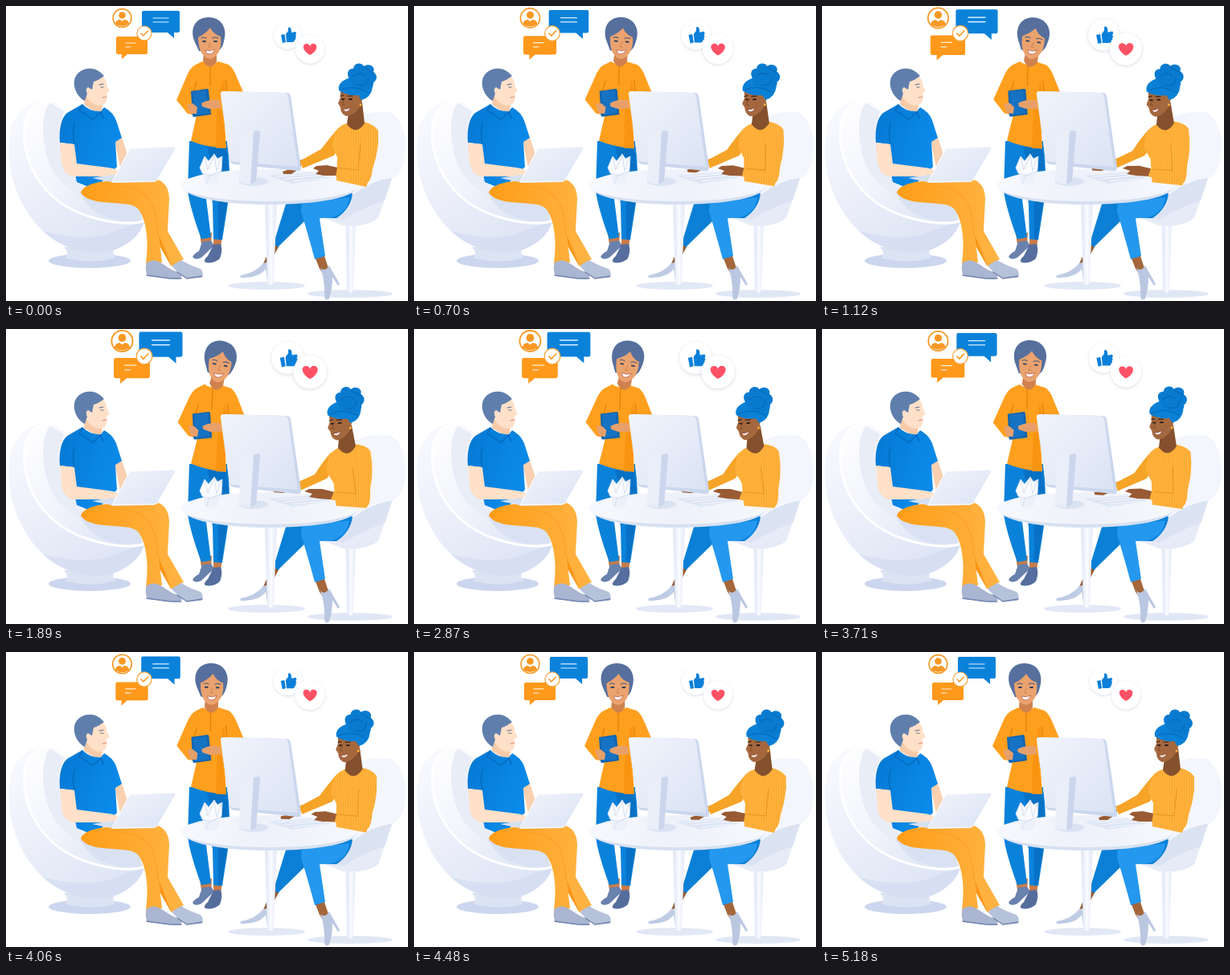
Write an HTML page that moves like this. It is 500x367 px and loops after 5250 ms.

```html
<!DOCTYPE html>
<html lang="en">
<head>
<meta charset="utf-8">
<title>Team at work</title>
<style>
html, body { margin: 0; width: 100%; height: 100%; overflow: hidden; background: #fff; }
svg { display: block; width: 100vw; height: 100vh; }
.line { fill: none; stroke-linecap: round; stroke-linejoin: round; }
</style>
</head>
<body>
<svg viewBox="0 0 500 367" preserveAspectRatio="none">
<defs>
  <linearGradient id="shell" x1="0" y1="0" x2=".6" y2="1"><stop stop-color="#fafbff"/><stop offset=".55" stop-color="#eceffa"/><stop offset="1" stop-color="#dfe5f5"/></linearGradient>
  <linearGradient id="inner" x1="0" y1="0" x2="1" y2="1"><stop stop-color="#fff"/><stop offset=".45" stop-color="#f3f5fc"/><stop offset="1" stop-color="#d9e1f3"/></linearGradient>
  <linearGradient id="panel" x1="0" y1="0" x2="1" y2="1"><stop stop-color="#f1f4fc"/><stop offset="1" stop-color="#dbe3f4"/></linearGradient>
  <linearGradient id="top" x1="0" x2="1"><stop stop-color="#f8f9fe"/><stop offset=".5" stop-color="#eef1fa"/><stop offset="1" stop-color="#f6f8fd"/></linearGradient>
  <linearGradient id="pole" x1="0" x2="1"><stop stop-color="#dbe3f3"/><stop offset=".5" stop-color="#fafbff"/><stop offset="1" stop-color="#e2e8f6"/></linearGradient>
  <linearGradient id="shirt" x1="0" x2="1" y2=".6"><stop stop-color="#0478d2"/><stop offset="1" stop-color="#0c8cec"/></linearGradient>
  <linearGradient id="trousers" x1="0" x2="1"><stop stop-color="#ff9d18"/><stop offset="1" stop-color="#ffb445"/></linearGradient>
  <pattern id="rib" width="3" height="8" patternUnits="userSpaceOnUse"><rect width="3" height="8" fill="#ffb23d"/><rect width=".8" height="8" fill="#f9a62b"/></pattern>
  <filter id="soft" x="-40%" y="-40%" width="180%" height="180%"><feDropShadow dx="0" dy="1" stdDeviation="1.7" flood-color="#7d8dad" flood-opacity=".32"/></filter>
</defs>

<!-- round chair -->
<ellipse cx="104" cy="317" rx="51" ry="9" fill="#ccd6ee"/>
<path d="M72 300Q80 309 73 313Q104 322 137 313Q130 309 137 299Z" fill="#dce4f4"/>
<path d="M63 118C37 112 14 127 7 150C-5 196 14 250 46 280C72 305 118 317 150 296C162 288 169 279 172 268L150 240L92 220L76 130Z" fill="url(#shell)"/>
<path d="M46 280C72 305 118 317 150 296C162 288 169 279 172 268C140 275 122 300 46 280Z" fill="#cdd8ef" opacity=".5"/>
<path d="M63 118C42 115 26 126 23 148C19 196 46 244 104 262C130 270 158 273 172 267L150 236L92 220L76 128Z" fill="url(#inner)" stroke="#fff" stroke-width="3"/>
<path d="M55 120C40 138 44 190 66 216Q79 231 96 236L92 205L69 196L66 150L72 131Z" fill="#e9edf8"/>
<path d="M92 232Q99 250 120 261Q150 270 170 266Q166 247 150 239Z" fill="#d9e1f2"/>

<!-- seated man -->
<path d="M98 111L97 123L118 136L120 124Z" fill="#f7cba9"/>
<path d="M99 93Q104 83 118 86Q126 91 125 98L129 106L125 108Q127 119 121 123Q113 126 104 118L97 109Z" fill="#ffe0c8"/>
<path d="M98 118C88 113 82 99 86 89C91 77 108 74 118 83L122 87Q114 93 109 94L107 104L102 101Q98 103 101 109Z" fill="#5f7eac"/>
<path class="line" d="M116 98L121 97M118 101L121 101" stroke="#60708f" stroke-width="1.2"/>
<path class="line" d="M120 114L125 113" stroke="#d98d7b" stroke-width="1.1"/>
<path d="M134 162L143 160Q149 179 153 190L142 201Z" fill="#f9d0b0"/>
<path d="M95 122Q105 132 118 131L122 126Q134 132 138 145L144 164L136 169L138 200L110 228L88 219Q83 200 85 172L67 170Q65 143 76 133Z" fill="url(#shirt)"/>
<path class="line" d="M95 123L91 130L108 141L118 132L121 140M85 172Q82 157 85 147" stroke="#0368b9" stroke-width="1.3"/>
<path d="M67 170L85 172L88 196L127 201Q140 202 146 210L138 215L121 212L83 212Q71 209 69 194Z" fill="#ffe0c8"/>
<path d="M160 244Q187 235 194 255L201 288L219 315L205 323L188 293Z" fill="#f99515"/>
<path d="M93 232C97 221 118 217 145 217L181 215C196 215 203 226 203 240L201 280L221 315L206 324L190 284L194 319L174 321C177 297 176 277 169 260C165 249 157 247 145 246C125 244 101 245 93 232Z" fill="url(#trousers)"/>
<path class="line" d="M126 224Q164 222 178 240Q187 254 189 283" stroke="#fba126" stroke-width="1.2"/>
<path d="M175 319Q184 314 192 319L206 328L218 333Q220 339 214 340L176 336Q172 327 175 319Z" fill="#a9b5d1"/>
<path d="M206 323L218 316Q227 322 242 327Q247 333 243 338L225 339Q212 331 206 323Z" fill="#b6c2da"/>
<path class="line" d="M175 335L204 339L218 339M213 331L225 339L244 336" stroke="#7185ad" stroke-width="1.4"/>
<path d="M107 214L132 210L188 215L185 219L135 220Z" fill="#d7e0f1"/>
<path d="M154 177L208 175Q212 175 210 179L189 215Q188 218 184 218L132 219Z" fill="url(#panel)" stroke="#fff" stroke-width="1"/>

<!-- standing woman -->
<path d="M241 282L256 282L255 298L243 297ZM258 280L270 280L267 300L258 300Z" fill="#c87b48"/>
<path d="M228 168L275 168Q281 215 275 252L269 291L258 290L257 246L252 216L249 240L255 288L243 290Q229 252 226 230Z" fill="#0b82da"/>
<path d="M250 174L274 174Q280 217 274 252L268 290L264 290L264 235Z" fill="#0671c5"/>
<path d="M244 293L255 292L259 298L243 313Q235 317 232 312Q234 308 240 305Z" fill="#6981ad"/>
<path d="M258 297L267 296Q270 304 266 314Q259 321 248 319Q245 316 251 311Z" fill="#556e9d"/>
<g id="standing">
  <path d="M244 69Q254 76 264 69L277 73Q283 78 286 86L295 107L288 126L271 130L274 177Q250 176 230 168L237 136L226 134L212 117L224 89Q229 76 236 73Z" fill="#ff9f1e"/>
  <path d="M270 91L273 106L268 126L274 177L261 177L262 133Z" fill="#f68f0c" opacity=".65"/>
  <path class="line" d="M254 74L254 99M237 94L233 108M273 92L275 108" stroke="#df7d08" stroke-width="1.1"/>
  <path d="M230 106L250 103Q252 103 252 105L255 135L234 138Q232 138 232 136Z" fill="#1465ad"/>
  <path d="M232 107L249 105L252 133L235 136Z" fill="#1672c2"/>
  <path d="M225 122L232 121L238 126L237 134L229 134Z" fill="#e8a06b"/>
  <path d="M243 121Q254 115 266 117L268 127L253 128L244 125Z" fill="#e8a06b"/>
  <path d="M265 116L286 108L289 124L268 130Z" fill="#ffa52b"/>
  <g id="standingHead">
    <path d="M246 57L262 57L262 69Q254 82 245 69Z" fill="#cf8250"/>
    <path d="M234 43C228 25 238 14 252 14C268 14 276 28 271 44Q269 54 262 57L240 56Z" fill="#566f9d"/>
    <path d="M239 39Q249 34 254 27Q258 35 267 38Q269 53 262 61Q254 70 246 62Q239 55 239 39Z" fill="#eaa26e"/>
    <path class="line" d="M243 40Q246 38 249 40M257 40Q260 38 264 40" stroke="#465b82" stroke-width="1.1"/>
    <path class="line" d="M245 44L248 44M259 44L262 44" stroke="#34405c" stroke-width="1.9"/>
    <path class="line" d="M254 45L252 51L255 51" stroke="#cd8050" stroke-width=".9"/>
    <path d="M248 55Q254 57 260 54Q256 62 250 59Z" fill="#fff" stroke="#b95c4b" stroke-width=".7"/>
  </g>
</g>

<!-- shell chair and its base -->
<ellipse cx="428" cy="358" rx="53" ry="5" fill="#e0e7f4"/>
<path d="M423 264L435 264L432 354Q428 359 424 354Z" fill="url(#pole)"/>
<path d="M433 140Q455 130 474 132Q488 134 495 159C499 177 497 207 480 214L463 264Q447 276 419 273L386 260L420 235Z" fill="#e6ebf7"/>
<path d="M433 140Q455 130 474 132Q488 134 495 159C499 177 497 207 480 214Q452 217 424 241L429 205Z" fill="#f4f6fd"/>
<path d="M424 241Q452 217 480 214L471 242Q449 248 420 266L388 259Z" fill="#dbe3f3"/>

<!-- seated woman's legs -->
<ellipse cx="324" cy="348" rx="48" ry="5" fill="#e2e8f5"/>
<path d="M333 291L342 294L326 324L319 323Z" fill="#96592f"/>
<path d="M350 240L431 233Q429 252 411 264L376 263L338 300L333 295Z" fill="#0b80d6"/>
<path d="M320 320L327 318L325 341L323 327Q316 337 297 338Q289 339 292 335Q310 332 320 320Z" fill="#c0cce4"/>
<path d="M383 309L395 308L402 329L398 339L390 327Z" fill="#a4663b"/>
<path d="M368 246L427 238Q425 255 409 262L390 264L397 311L384 315Q374 278 367 256Z" fill="#2498ee"/>
<path d="M391 326Q397 331 402 323L415 346L413 348L406 337Q406 352 402 364Q397 368 396 361Q397 342 391 326Z" fill="#bac7e1"/>

<!-- table -->
<path d="M322 240L337 240L333 344Q329 350 325 344Z" fill="url(#pole)"/>
<path d="M217 221C217 237 264 247 327 247S437 238 438 223Z" fill="#d7e0f1"/>
<ellipse cx="327.500" cy="223" rx="110.500" ry="20" fill="url(#top)"/>
<path d="M326 211L379 207L404 214L356 221Z" fill="#dde5f4"/>
<path class="line" d="M337 212L383 209M347 215L391 211M357 218L397 214" stroke="#f6f8fe" stroke-width="1"/>
<path d="M243 199L268 199L264 220Q255 225 247 221Z" fill="#edf1fa"/>
<path d="M241 201L247 187L252 193L259 184L263 190L269 187L268 205L256 211L244 208Z" fill="#f9fbff" stroke="#d5deef" stroke-width=".8"/>
<path class="line" d="M247 188L251 204L259 185L262 205L268 188M250 220L252 211L263 207" stroke="#d5deef" stroke-width="1"/>

<!-- seated woman's upper body -->
<path id="farHand" fill="#9a5c33"/>
<path id="farSleeve" fill="#f6a428"/>
<g id="sitting">
  <path d="M424 146Q433 159 444 144Q458 147 463 155Q464 181 456 202L448 225L411 217L412 188L406 175Q407 150 424 146Z" fill="url(#rib)"/>
  <g id="sittingHead">
    <path d="M427 126L443 120L446 146Q435 162 424 147Z" fill="#85502d"/>
    <path d="M416 104L438 101Q447 114 440 126Q432 137 423 137Q416 134 416 126L413 121L416 114Z" fill="#a5683e"/>
    <path d="M414 105Q412 96 423 91L433 87Q447 88 456 101Q454 114 442 117L438 111Q424 112 414 105Z" fill="#0a80d6"/>
    <path d="M428 92C422 84 426 77 432 78C433 70 443 70 445 75C453 70 460 77 457 82C464 87 460 94 457 95C458 104 447 107 444 102C438 105 429 99 428 92Z" fill="#087bd0"/>
    <path class="line" d="M431 88Q440 80 447 87M438 98Q451 101 451 89M445 76Q453 82 457 83M417 104Q433 97 451 108" stroke="#0567b3" stroke-width="1"/>
    <path class="line" d="M416 112L420 111M425 112L431 112" stroke="#3b2318" stroke-width="1.2"/>
    <path class="line" d="M418 116L420 116M427 116L430 116" stroke="#281a17" stroke-width="1.8"/>
    <path class="line" d="M422 115L418 122L421 123" stroke="#764322" stroke-width=".8"/>
    <path d="M419 128Q424 129 429 126Q426 133 421 131Z" fill="#f7e8e0" stroke="#833c30" stroke-width=".7"/>
    <circle cx="441" cy="123" r="1.500" fill="#ffb23d"/>
  </g>
</g>
<path id="nearHand" fill="#995b34"/>
<path id="nearSleeve" fill="url(#rib)"/>
<path id="fold" class="line" stroke="#e49622" stroke-width="1.100"/>

<!-- monitor -->
<path d="M289 217Q303 209 325 216Q332 221 310 224Q291 224 289 217Z" fill="#dbe3f3"/>
<path d="M270 106L349 108Q353 108 354 112L367 201Q367 206 362 205L284 197Q279 196 278 192L267 110Q267 106 270 106Z" fill="#cbd7ed"/>
<path d="M270 106L346 108Q350 108 351 112L363 200L283 194Q279 194 278 190L267 110Q267 106 270 106Z" fill="url(#panel)"/>
<path d="M293 157L314 155Q317 156 316 160L311 219Q301 225 290 218Z" fill="#e9eef9"/>
<path d="M308 156L314 155Q317 156 316 160L311 219L304 222Z" fill="#cbd6ec"/>

<!-- floating icons -->
<g id="speech">
  <path d="M171 6H214Q216 6 216 8V31Q216 33 214 33H209V40L201 33H171Q169 33 169 31V8Q169 6 171 6Z" fill="#0b82da"/>
  <path class="line" d="M183 15H202M183 20H202" stroke="#d9efff" stroke-width="1.200"/>
</g>
<g id="reply">
  <path d="M139 38H174Q176 38 176 40V58Q176 60 174 60H151L144 66V60H139Q137 60 137 58V40Q137 38 139 38Z" fill="#ff991c"/>
  <path class="line" d="M149 46H161M149 51H155" stroke="#fff0d8" stroke-width="1.200"/>
</g>
<g id="avatar">
  <circle cx="144.500" cy="15" r="11.400" fill="#fff" stroke="#f89824" stroke-width="1.600"/>
  <circle cx="144.500" cy="11.500" r="4.300" fill="#f89824"/>
  <path d="M136 22Q137 17 142 17L144.500 19L147 17Q152 17 153 22Q144.500 28 136 22Z" fill="#f89824"/>
</g>
<g id="check">
  <circle cx="172" cy="34" r="9" fill="#fff" stroke="#f8a33a" stroke-width="1.200"/>
  <path class="line" d="M168 34L171 37L176.500 31" stroke="#f89824" stroke-width="1.500"/>
</g>
<g id="like">
  <circle cx="350.500" cy="36" r="17.500" fill="#fff" filter="url(#soft)"/>
  <path d="M342 36L346.500 35L348 45L344 46ZM348 35L351 31L351 27Q355 25 355 33L360 32Q362 34 360 36Q362 38 360 39Q361 42 359 42Q359 45 356 45L349 45Z" fill="#0b80da"/>
</g>
<g id="love">
  <circle cx="378" cy="53.500" r="18" fill="#fff" filter="url(#soft)"/>
  <path d="M378 61C368 55 368 47 374 47Q377 47 378 50Q380 46 383 47C389 48 387 57 378 61Z" fill="#ff5165"/>
</g>
</svg>
<script>
const LOOP = 5250;
const $ = id => document.getElementById(id);
const smooth = p => { p = Math.min(1, Math.max(0, p)); return p * p * (3 - 2 * p); };
const lean = t => smooth(t / 1700) - smooth((t - 2600) / 2100);

// Pairs of outlines: upright and leaning
const limbs = {
  farHand: ['M372 190L364 203L355 209L345 209L344 206L353 203L362 193Z',
            'M371 188L357 201L344 204L333 203L332 200L342 198L361 191Z'],
  farSleeve: ['M414 151Q405 161 392 178L365 193L369 202L408 186L419 167Z',
              'M405 153Q395 163 384 181L364 190L366 201L399 186L411 169Z'],
  nearHand: ['M417 202L399 198L386 199L382 202L389 205L385 209L395 211L418 211Z',
             'M413 204L393 199L377 199L371 202L381 205L377 209L389 211L415 213Z'],
  nearSleeve: ['M444 157Q464 153 463 171L456 202Q454 223 444 221L410 212L412 201L436 204L440 185Z',
               'M434 160Q454 153 454 171L453 202Q454 223 445 222L404 212L408 202L435 205L435 185Z'],
  fold: ['M441 171L438 204L416 202', 'M431 172L435 205L410 203']
};
const blend = ([from, to], s) => {
  const ends = to.match(/-?[\d.]+/g);
  let i = 0;
  return from.replace(/-?[\d.]+/g, n => (+n + (ends[i++] - n) * s).toFixed(2));
};
const rotate = (id, angle, x, y, dx = 0) =>
  $(id).setAttribute('transform', `translate(${dx} 0) rotate(${angle} ${x} ${y})`);
const grow = (id, k, x, y) =>
  $(id).setAttribute('transform', `translate(${x} ${y}) scale(${k}) translate(${-x} ${-y})`);

function draw(t) {
  const s = lean(t);
  rotate('standing', 1.7 * s, 250, 172);
  rotate('standingHead', 9 * s, 254, 69, 5 * s);
  rotate('sitting', -8.2 * s, 432, 222);
  rotate('sittingHead', 4 * s, 433, 143);
  for (const id in limbs) $(id).setAttribute('d', blend(limbs[id], s));
  const k = 1 + 0.15 * s;
  grow('speech', k, 192.5, 22);
  grow('reply', k, 156.5, 52);
  grow('avatar', k, 144.5, 15);
  grow('check', 1 + 0.1 * s, 172, 34);
  grow('like', k, 350.5, 36);
  grow('love', k, 378, 53.5);
}

const start = performance.now();
function tick() {
  draw((performance.now() - start) % LOOP);
  requestAnimationFrame(tick);
}
tick();
</script>
</body>
</html>
```
